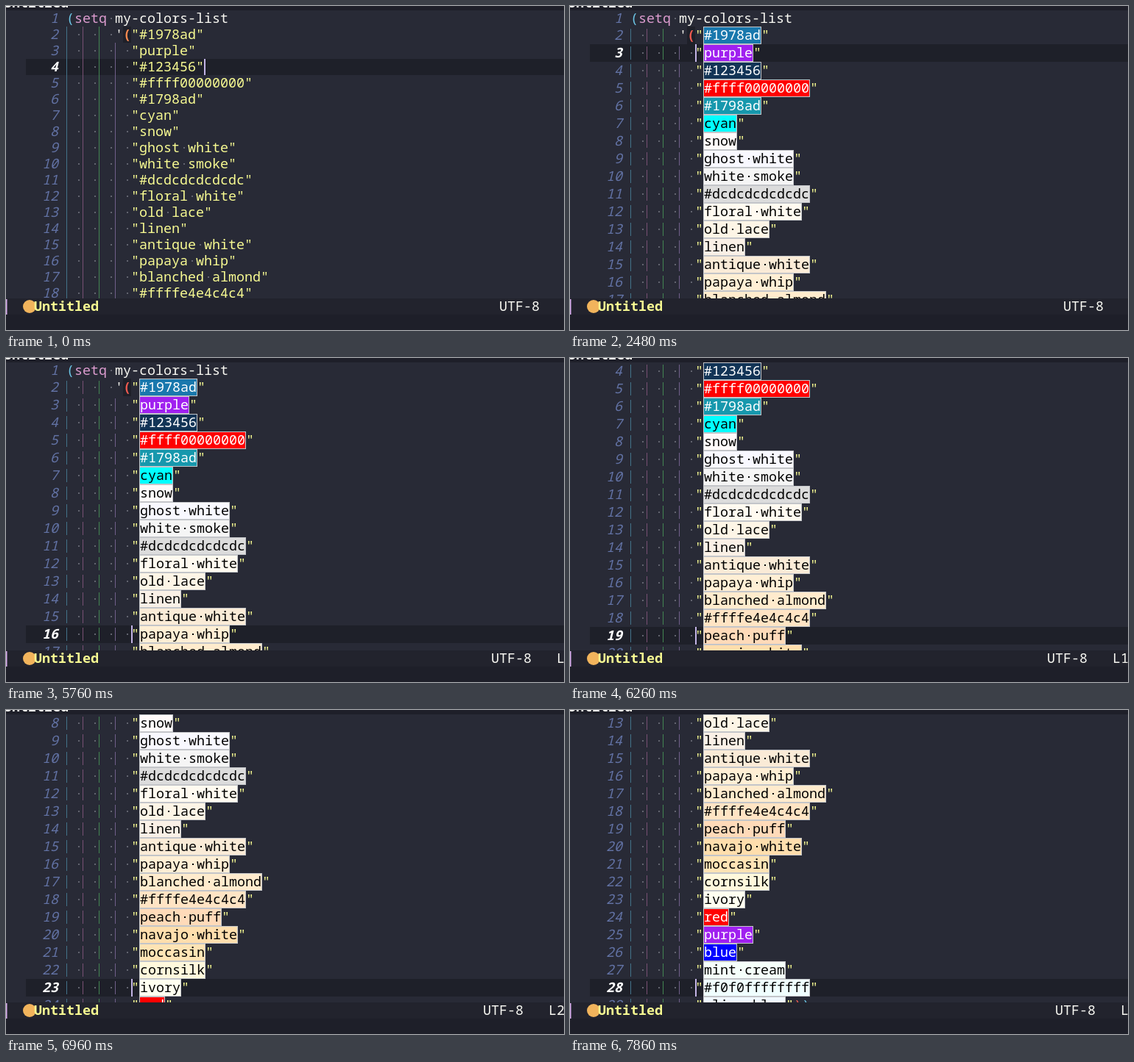
An HTML page with a canvas that plays this animation: 758 by 441 pixels, repeating every 8 s.

```html
<!DOCTYPE html>
<html lang="en">
<head>
<meta charset="utf-8">
<style>
html, body { margin: 0; width: 100%; height: 100%; overflow: hidden; background: #282a36; }
canvas { display: block; }
</style>
</head>
<body>
<canvas id="stage" width="758" height="441"></canvas>
<script>
const ctx = document.getElementById('stage').getContext('2d');
const W = 758, H = 441, LOOP = 8000, CH = 11, LEFT = 82, TOP = 6;
const FACE = '"Noto Sans Mono", "DejaVu Sans Mono", monospace';
const SIZE = 18.333;

const BG = '#282a36', DARK = '#1e1f29', BAR = '#22232d', WHITE = '#f8f8f2';
const YELLOW = '#f8fb92', PURPLE = '#bd93f9', DOT = '#62646f', RED = '#f05a50', BLUE = '#6cc4e4';
const GUIDES = ['#43738a', '#785073', '#438552', '#705f8a'];

const colors = ['#1978ad', 'purple', '#123456', '#ffff00000000', '#1798ad', 'cyan', 'snow',
  'ghost white', 'white smoke', '#dcdcdcdcdcdc', 'floral white', 'old lace', 'linen',
  'antique white', 'papaya whip', 'blanched almond', '#ffffe4e4c4c4', 'peach puff',
  'navajo white', 'moccasin', 'cornsilk', 'ivory', 'red', 'purple', 'blue', 'mint cream',
  '#f0f0ffffffff', 'alice blue'];
const LAST = colors.length + 1;
const DARK_FILLS = /^(#1|#ffff0|purple|red|blue)/;

// [time, line of the cursor]
const moves = [[0, 4], [2280, 3], [2880, 2], [3080, 1], [3480, 2], [3880, 3], [4080, 5],
  [4280, 6], [4450, 7], [4550, 9], [4650, 10], [4850, 11], [5150, 12], [5550, 13],
  [5650, 14], [5760, 16], [5960, 17], [6060, 18], [6260, 19], [6460, 20], [6660, 21],
  [6860, 22], [6960, 23], [7160, 24], [7360, 25], [7560, 26], [7660, 27], [7860, 28]];

function rect(x, y, w, h, fill) {
  ctx.fillStyle = fill;
  ctx.fillRect(x, y, w, h);
}

function text(s, x, y, fill, style = '500', size = SIZE) {
  ctx.font = `${style} ${size}px ${FACE}`;
  ctx.fillStyle = fill;
  ctx.fillText(s, x, y);
}

function dots(s, x, y, fill) {
  [...s].forEach((c, i) => {
    if (c === ' ') rect(x + i * CH + 5, y + 10, 2, 2, fill);
  });
}

function cssColor(name) {
  if (name === 'purple') return '#a020f0';
  if (name[0] === '#' && name.length === 13) {
    return '#' + [1, 5, 9].map(i => name.slice(i, i + 2)).join('');
  }
  return name.replace(' ', '');
}

function drawIndent(line, y, h, s) {
  const cols = line === 2 ? 3 : 4;
  for (let i = 0; i < cols; i++) {
    const x = LEFT + i * 2 * CH;
    const fill = i === 3 && s.bright ? PURPLE : GUIDES[i];
    if (s.painted) rect(x, y + 3, 1, 18, fill);
    else rect(x, y, 1, h, fill);
    rect(x + CH + 5, y + h / 2 - 1, 2, 2, DOT);
  }
}

// Returns the x where the text after the closing quote goes on.
function drawColor(name, y, base, s) {
  const x = LEFT + 8 * CH, w = name.length * CH;
  text('"', x, base, YELLOW);
  if (!s.painted) {
    text(name + '"', x + CH, base, YELLOW);
    dots(name, x + CH, y, DOT);
    return x + w + 2 * CH;
  }
  const ink = DARK_FILLS.test(name) ? '#fff' : '#000';
  rect(x + CH, y, w + 2, 24, '#c3c5c9');
  rect(x + CH + 1, y + 1, w, 22, cssColor(name));
  text(name, x + CH + 1, base, ink);
  dots(name, x + CH + 1, y + 1, ink);
  text('"', x + CH + w + 2, base, YELLOW);
  return x + w + 2 * CH + 2;
}

function drawLine(line, y, h, s) {
  const current = line === s.line, base = y + (h === 24 ? 18 : 17);
  if (current) rect(27, y, W - 27, h, '#1e2029');
  const label = String(line);
  text(label, 71 - label.length * CH, base, current ? '#fff' : '#6272a4',
    current ? 'italic bold' : 'italic 500');

  if (line === 1) {
    text('(', LEFT, base, BLUE);
    text('setq', LEFT + CH, base, '#dc9ccf');
    text('my-colors-list', LEFT + 6 * CH, base, WHITE);
    dots(' ', LEFT + 5 * CH, y, DOT);
  } else {
    drawIndent(line, y, h, s);
    if (line === 2) {
      text("'", LEFT + 6 * CH, base, WHITE);
      const x = LEFT + 7 * CH;
      if (s.match) rect(x, y, CH, h, '#1e2029');
      const fill = s.painted ? RED : s.mini ? '#e879b9' : '#ff8a50';
      text('(', x, base, fill, s.mini ? '500' : 'bold');
    }
    const end = drawColor(colors[line - 2], y, base, s);
    if (line === LAST) {
      text(')', end, base, RED);
      text(')', end + CH, base, BLUE);
    }
  }
  if (current && !s.mini) rect(s.cursorX, y, 2, h, '#c3b4e6');
}

function drawModeLine(y, s) {
  rect(0, y, W, H - y, DARK);
  rect(0, y, W, 22, BAR);
  rect(0, y + 1, 1.5, 21, '#d9aef0');
  ctx.fillStyle = '#f2b45c';
  ctx.beginPath();
  ctx.arc(32, y + 11, 9, 0, 7);
  ctx.fill();
  text('Untitled', 38, y + 17, YELLOW, 'bold');
  const shift = (s.line > 9) + (s.line > 16 && s.line < 28);
  const x = 670 - shift * CH;
  text('UTF-8', x, y + 17, WHITE);
  text('L' + s.line, x + 8 * CH + 1, y + 17, WHITE);
}

function drawPrompt() {
  ctx.strokeStyle = PURPLE;
  ctx.lineWidth = 2.5;
  ctx.beginPath();
  ctx.arc(8, 405, 7.5, 0, 7);
  ctx.moveTo(13.5, 410.5);
  ctx.lineTo(21, 418);
  ctx.stroke();
  text('( 1/7279 ) M-x', 26, 416, PURPLE, 'bold', 23.333);
}

function draw(t) {
  const s = {
    line: moves.filter(m => m[0] <= t).pop()[1],
    mini: t >= 800 && t < 1780,
    painted: t >= 1780,
    bright: t >= 3480 && t < 4080,
    cursorX: t < 100 ? 269 : 170
  };
  s.match = !s.mini && !s.bright;
  const bottom = s.mini ? 370 : 398;

  rect(0, 0, W, H, BG);
  rect(0, 0, W, TOP, DARK);
  text('Untitled', -3, 2, WHITE, 'bold');

  let y = TOP;
  for (let line = Math.max(1, s.line - 15); line <= LAST && y < bottom; line++) {
    const h = s.painted && line > 1 ? 24 : 22;
    drawLine(line, y, h, s);
    y += h;
  }
  drawModeLine(bottom, s);
  if (s.mini) drawPrompt();
  if (t >= 1570 && t < 2480) text('Tintwise mode enabled in current buffer', 304, 438, WHITE);
}

const start = performance.now();
function tick() {
  draw((performance.now() - start) % LOOP);
  requestAnimationFrame(tick);
}
tick();
</script>
</body>
</html>
```
